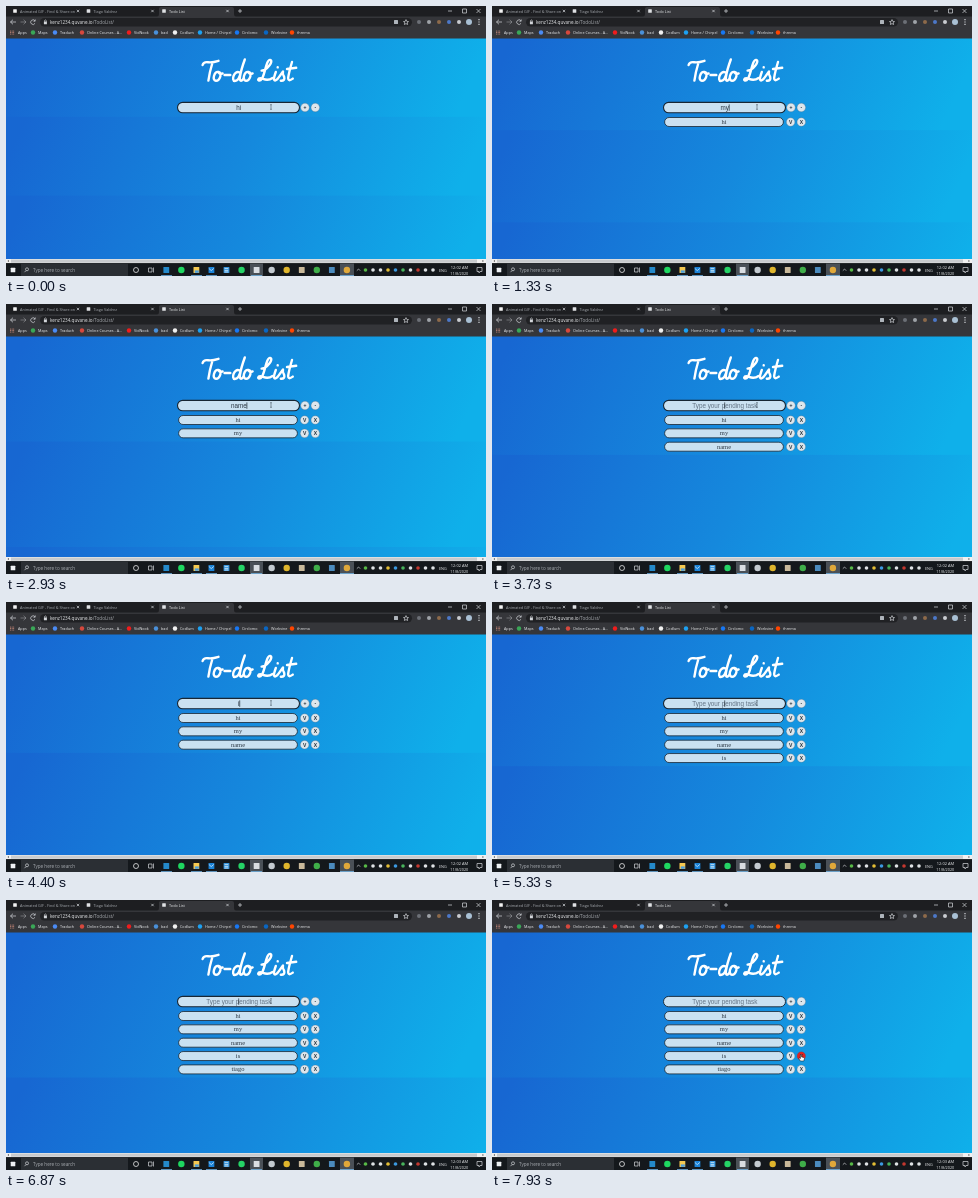
An HTML page that plays this animation: 480 px wide and 270 px high, repeating every 8000 ms.

```html
<!DOCTYPE html>
<html lang="en">
<head>
<meta charset="utf-8">
<title>To-do List</title>
<style>
  html, body { margin: 0; width: 100%; height: 100%; overflow: hidden; background: #202124; }
  #page {
    position: absolute; left: 0; top: 32px; width: 480px; height: 222px;
    background-image: linear-gradient(115deg, #1767d2 4%, #1589dd 50%, #0fb0ea 94%);
  }
  svg { position: absolute; left: 0; top: 0; }
  text { font-family: "Open Sans", "Noto Sans", sans-serif; white-space: pre; }
  .ui { font-size: 4px; fill: #eceef0; }
  .dim { fill: #a9adb2; }
  .icon { fill: none; stroke: #d3d6da; stroke-width: .7; }
  .title { fill: none; stroke: #fff; stroke-width: 2.4; stroke-linecap: round; stroke-linejoin: round; }
  .field { fill: #cae1f1; stroke: #182633; }
  .entry { font: 6.3px "Liberation Sans", Arial, sans-serif; fill: #2c3844; text-anchor: middle; }
  .task { font: 6.5px "Liberation Serif", "Times New Roman", serif; fill: #2c3844; text-anchor: middle; }
  .hint { fill: #637485; }
  .btn { fill: #dde6ec; stroke: #4a6076; stroke-width: .3; }
  .sign { font: bold 5px "Liberation Sans", Arial, sans-serif; fill: #26323d; text-anchor: middle; }
  .hot { fill: #e3211f; }
</style>
</head>
<body>
<div id="page"></div>
<svg width="480" height="270" viewBox="0 0 480 270">
  <!-- browser frame -->
  <path fill="#1d1e21" d="M0 0H480V11H0z"/>
  <path fill="#35363a" d="M0 10.5H151Q153 10.5 153 8V2.5Q153 1 155 1H226Q228 1 228 3V8Q228 10.5 230 10.5H480V32.4H0z"/>
  <rect x="34" y="12" width="372" height="8.4" rx="4.2" fill="#202124"/>
  <path class="icon" d="M232 5H236M234 3V7M442 5H446M456.5 3H460.5V7H456.5zM470.5 3L474.5 7M474.5 3L470.5 7"/>
  <path class="icon" d="M10 16H4.5M7 13.7L4.5 16L7 18.3M29 15A2.3 2.3 0 1 0 29 17.3M29.2 13.4V15.2H27.4"/>
  <path class="icon" opacity=".5" d="M14.5 16H20M17.5 13.7L20 16L17.5 18.3"/>
  <path fill="#d3d6da" d="M37.9 15.6H40.9V18.2H37.9zM472.4 13h1.2v1.2h-1.2zM472.4 15.4h1.2v1.2h-1.2zM472.4 17.8h1.2v1.2h-1.2z"/>
  <path class="icon" d="M38.5 15.6V14.6Q39.4 13.3 40.3 14.6V15.6M400 13.6L400.8 15.4L402.5 15.6L401.2 16.8L401.6 18.5L400 17.6L398.4 18.5L398.8 16.8L397.5 15.6L399.2 15.4z"/>
  <g id="chrome"></g>

  <!-- page -->
  <g class="title" role="img" aria-label="To-do List">
    <path d="M196.6 59Q197.6 55.6 202 56.2T212.5 54.8M206.5 56.5Q203.6 66 202.4 74.6"/>
    <path id="o" d="M212.6 66C208 65 205.8 74.6 209.8 74.8C214 75 216.6 66.4 212.6 66q.8 3 4 1.4"/>
    <path d="M218.5 69H224.3"/>
    <path d="M233.4 66.4C228 64 225 74.8 228.8 75C231.8 75 234 70 234.8 66M238.8 53.5Q235 64 234 70.5Q233.2 75.2 235.6 74.6L238 72.4"/>
    <use href="#o" x="30"/>
    <path d="M255.6 64.6C261 64.4 268 54.8 264.2 53.9C260.4 53.2 259 68 256 72.6C254 75.8 250.8 74.6 252.8 72.6C256 70.4 259.5 77 266.5 72"/>
    <path d="M269.8 66Q267.6 72 268 73.6Q269 75.8 272 72.4L277 65.5Q276.2 68 278.2 71Q279.2 75 274.8 74.7M271.7 61.3v.1"/>
    <path d="M286 56Q282.8 67 282.2 71.6Q282 76.2 286.8 72.6M281 63L290.2 61.8"/>
  </g>
  <rect id="box" class="field" x="171.5" y="96.4" width="122" height="10.4" rx="5.2"/>
  <text id="entry" class="entry" x="232.8" y="103.9"></text>
  <path id="caret" d="M0 98.4V104.8" stroke="#1b2630" stroke-width=".7"/>
  <g id="list"></g>

  <!-- scrollbar and taskbar -->
  <path fill="#f1f1f1" d="M0 253H480V257.2H0z"/>
  <path fill="#c8cbce" d="M5 253.5H471V256.7H5z"/>
  <path fill="#555" d="M1.4 255.1l1.6-1v2zM478 255.1l-1.6-1v2z"/>
  <path fill="#14181c" d="M0 257.2H480V270H0z"/>
  <path fill="#2b2f34" d="M15 257.4H122V270H15z"/>
  <path fill="#4a5057" d="M334 257.4H348V270H334zM244 257.4H257V270H244z"/>
  <path fill="#76b9ed" d="M155 269.2h11v.8h-11zM185 269.2h11v.8h-11zM200 269.2h11v.8h-11zM245 269.2h11v.8h-11zM334 269.2h14v.8h-14z"/>
  <circle class="icon" cx="21" cy="263.3" r="1.5"/>
  <path class="icon" d="M20 264.6L18.5 266.2M142.5 262H146V266H142.5zM147.5 261.5V266.5M350.8 264.7L352.5 263L354.2 264.7M471 261.5H476V265.5H474L473 267V265.5H471z"/>
  <circle cx="130" cy="264" r="2.5" class="icon" style="stroke:#fff"/>
  <g id="dock"></g>
  <path fill="#4b9fe0" d="M188.8 264.4h4v2.4h-4z"/>
  <path fill="none" stroke="#eaf4fb" stroke-width=".7" d="M202.8 262.4L205.3 264.6L207.8 262.4M218.6 262.6h3.6M218.6 264.6h3.6M218.6 266h3.6"/>
  <text id="clock" class="ui" x="453.5" y="262.6" text-anchor="middle"></text>

  <g id="pointer">
    <path id="beam" fill="none" stroke="#2c3844" stroke-width=".5" d="M-.9 -2.3H.9M-.9 2.3H.9M0 -2.3V2.3"/>
    <path id="arrow" fill="#fff" stroke="#111" stroke-width=".4" d="M0 0V6L1.4 4.7L2.4 6.9L3.3 6.5L2.4 4.4H4.2z"/>
    <path id="hand" fill="#fff" stroke="#111" stroke-width=".5" d="M-.6 0Q0 -.7 .6 0V2L3 2.5Q3.5 2.7 3.4 3.6L2.8 6H-.6L-2.3 3.5Q-2 2.7 -.6 3.6z"/>
  </g>
</svg>
<script>
const $ = id => document.getElementById(id);
const add = (parent, tag, attrs, text = '') => {
  const el = document.createElementNS('http://www.w3.org/2000/svg', tag);
  for (const k in attrs) el.setAttribute(k, attrs[k]);
  el.textContent = text;
  return parent.appendChild(el);
};
const label = (parent, x, y, text, cls = 'ui', size = 4) =>
  add(parent, 'text', { x, y, class: cls, style: `font-size:${size}px` }, text);
const dot = (parent, x, y, fill, r = 2.2) => add(parent, 'circle', { cx: x, cy: y, r, fill });
const square = (parent, x, y, fill, s = 4.4) =>
  add(parent, 'rect', { x: x - s / 2, y: y - s / 2, width: s, height: s, rx: .5, fill });

// Tabs, address and bookmarks
const chrome = $('chrome');
[[9, 'Animated GIF - Find & Share on', 72], [82.5, 'Tiago Valdrez', 146.5], [158, 'Todo List', 221.5]].forEach(([x, name, end], i) => {
  square(chrome, x, 5, i ? '#dfe1e4' : '#f2f2f2', 3.6);
  label(chrome, x + 5, 6.5, name, i < 2 ? 'ui dim' : 'ui', 3.8);
  add(chrome, 'path', { class: 'icon', d: `M${end - 1.2} 3.8l2.4 2.4m0 -2.4l-2.4 2.4` });
});
const url = label(chrome, 44, 17.9, 'kenz1234.quvane.io', 'ui', 4.6);
add(url, 'tspan', { class: 'dim' }, '/TodoList/');
square(chrome, 390, 16, '#aeb4bb', 4);
['#6c7076', '#9fa3a8', '#8d6a4a', '#4c78c8', '#c9ccd0', '#a9c0d4'].forEach((c, i) => dot(chrome, 413 + i * 10, 16, c, i > 4 ? 3 : 2));

for (let i = 0; i < 9; i++) square(chrome, 4.5 + i % 3 * 1.6, 24.9 + (i / 3 | 0) * 1.6, '#d08d7d', 1);
[
  [27, '#3aa757', 'Maps'], [49, '#4b8bf4', 'Traduch'], [76, '#d6483d', 'Online Courses - A...'],
  [123, '#f01c1c', 'VidNook'], [150, '#4a90d9', 'bad'], [169, '#f0f0f0', 'Codlum'],
  [194, '#1da1f2', 'Home / Chirpel'], [231, '#1877f2', 'Circlomo'], [260, '#0a66c2', 'Workvine'], [286, '#ff4500', 'threma']
].forEach(([x, fill, name]) => {
  dot(chrome, x, 26.5, fill);
  label(chrome, x + 5, 28, name, 'ui', 3.75);
});
label(chrome, 12, 28, 'Apps', 'ui', 3.75);

// Taskbar
const dock = $('dock');
square(dock, 7, 264, '#eef1f4', 4.6);
label(dock, 27, 265.7, 'Type here to search', 'ui dim', 4.6);
[
  [square, '#2489ca'], [dot, '#1ed760'], [square, '#f5c951'], [square, '#1b83d8'], [square, '#3a96dd'],
  [dot, '#25d366'], [square, '#d9dde2'], [dot, '#c3cad0'], [dot, '#dfb52c'], [square, '#c9b99a'],
  [dot, '#3fae49'], [square, '#4b8bbe'], [dot, '#e0a83a']
].forEach(([shape, fill], i) => shape(dock, 160.3 + i * 15.05, 264, fill, shape === dot ? 3.2 : 5.8));
['#58b947', '#dfe2e5', '#dfe2e5', '#e4bd35', '#3c99e0', '#48b35c', '#dfe2e5', '#c4372f', '#dfe2e5', '#dfe2e5']
  .forEach((c, i) => dot(dock, 359.5 + i * 7.5, 264, c, 1.8));
label(dock, 433, 265.5, 'ENG', 'ui', 3.8);
label(dock, 444.3, 268.6, '11/8/2020', 'ui', 3.8);

// Task rows
const PITCH = 13.35, list = $('list');
const rowY = i => 116 + i * PITCH;
const button = (g, x, y, sign) => {
  const face = add(g, 'circle', { cx: x, cy: y, r: 4.3, class: 'btn' });
  add(g, 'text', { x, y: y + 1.8, class: 'sign' }, sign);
  return face;
};
button(list, 299, 101.5, '+');
button(list, 309.3, 101.5, '-');
const rows = ['hi', 'my', 'name', 'is', 'tiago'].map((task, i) => {
  const g = add(list, 'g', {}), y = rowY(i);
  add(g, 'rect', { class: 'field', x: 172.6, y: y - 4.5, width: 118.8, height: 9, rx: 4.5, 'stroke-width': .8 });
  add(g, 'text', { class: 'task', x: 232, y: y + 2 }, task);
  button(g, 298.6, y, 'V');
  return { g, kill: button(g, 309.3, y, 'X') };
});

// Entry edits; an empty value means the task was submitted
const edits = [
  [-530, 'hi'], [70, ''], [930, 'm'], [1330, 'my'], [1400, ''],
  [2070, 'n'], [2270, 'na'], [2670, 'nam'], [2870, 'name'], [3400, ''],
  [4330, 'i'], [4470, 'is'], [5200, ''],
  [5470, 't'], [5600, 'ti'], [5800, 'tia'], [5930, 'tiag'], [6130, 'tiago'], [6400, '']
];
const LOOP = 8000, BLINK = 530, BLUR = 7730;
const moves = [[6930, 265, 101], [7200, 301, 122.5], [7440, 311, 141], [7670, 309, 155]];

const pointerAt = t => {
  let a = moves[0];
  for (const b of moves) {
    if (t < b[0]) {
      const k = Math.max(0, (t - a[0]) / (b[0] - a[0] || 1));
      return [a[1] + (b[1] - a[1]) * k, a[2] + (b[2] - a[2]) * k];
    }
    a = b;
  }
  return [a[1], a[2]];
};
const show = (el, on) => el.setAttribute('visibility', on ? 'visible' : 'hidden');

function render(t) {
  const past = edits.filter(e => e[0] <= t);
  const [since, value] = past[past.length - 1];
  const count = past.filter(e => !e[1]).length;
  const focused = t < BLUR;

  $('page').style.backgroundSize = `480px ${78.8 + count * PITCH}px`;
  rows.forEach((r, i) => show(r.g, i < count));

  const entry = $('entry');
  entry.textContent = value || 'Type your pending task';
  entry.setAttribute('class', value ? 'entry' : 'entry hint');
  $('box').setAttribute('stroke-width', focused ? 1.1 : .9);
  const half = value ? entry.getComputedTextLength() / 2 + .3 : 0;
  $('caret').setAttribute('transform', `translate(${232.7 + half} 0)`);
  show($('caret'), focused && (t - since) % (2 * BLINK) < BLINK);

  const [x, y] = pointerAt(t);
  let over = false;
  rows.forEach((r, i) => {
    const hit = i < count && Math.hypot(x - 309.3, y - rowY(i)) < 4.3;
    r.kill.setAttribute('class', hit ? 'btn hot' : 'btn');
    over = over || hit;
  });
  const typing = x < 293 && y < 107;
  $('pointer').setAttribute('transform', `translate(${x} ${y})`);
  show($('beam'), typing);
  show($('hand'), over);
  show($('arrow'), !typing && !over);
  $('clock').textContent = t < 5800 ? '12:02 AM' : '12:03 AM';
}

const start = performance.now();
function tick() {
  render((performance.now() - start) % LOOP);
  requestAnimationFrame(tick);
}
tick();
</script>
</body>
</html>
```
